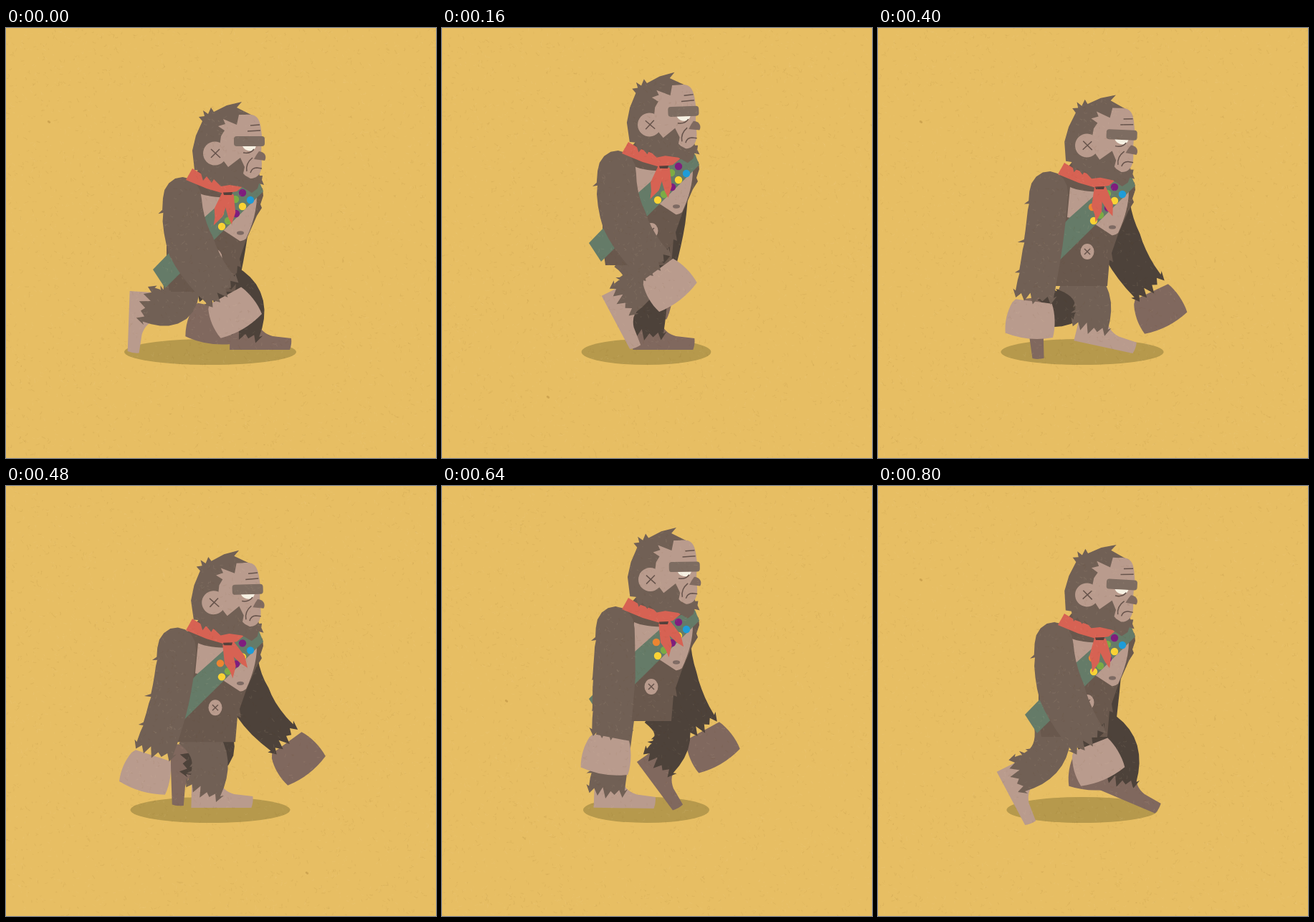
Write an HTML page with a canvas that moves like this. It is 600x600 px and loops after 0.84 s.

```html
<!DOCTYPE html>
<html lang="en">
<head>
<meta charset="utf-8">
<title>Walk cycle</title>
<style>
  html, body { margin: 0; width: 100%; height: 100%; overflow: hidden; background: #e7be63; }
  svg, canvas { position: absolute; left: 0; top: 0; width: 100%; height: 100%; display: block; }
  .fur { fill: #716055; }
  .dark { fill: #4d423a; }
  .skin { fill: #b99b8d; }
  .shade { fill: #80685e; }
  .red { fill: #d76253; }
  .line { fill: none; stroke: #66534b; stroke-width: 1.5; }
</style>
</head>
<body>
<svg viewBox="0 0 600 600">
  <rect width="600" height="600" fill="#e7be63"/>
  <ellipse id="shadow" cx="285" cy="452" ry="18" fill="#b6994c"/>

  <path id="farHand" class="shade"/>
  <path id="farArm" class="dark"/>
  <path id="farFoot" class="shade"/>
  <path id="farLeg" class="dark"/>

  <path id="nearFoot" class="skin"/>
  <path id="nearLeg" class="fur"/>

  <g id="body">
    <path fill="#69584d" d="M224 260L241 222L258 210L270 196L335 200L345 212L358 224L359 234L355 246L357 251L350 262L335 296L326 322L328 334L323 332L320 368L228 368L224 340Z"/>
    <path class="skin" d="M268 230Q290 240 350 235Q350 262 335 294Q330 298 326 297L300 280L264 272Z"/>
    <ellipse cx="327" cy="286" rx="5" ry="2.7" fill="#7d6a63"/>
    <path d="M205 337L268 272L322 224L353 213L359 228L222 363Z" fill="#657b68"/>
    <g id="badges"></g>
    <ellipse class="skin" cx="292" cy="320" rx="9.5" ry="11"/>
    <path class="line" d="M288 316l8 8m0 -8l-8 8"/>
  </g>

  <path id="cuff" class="dark" d="M8 -4L32 -6L25 5L12 8Z"/>
  <path id="nearHand" class="skin"/>
  <path id="nearArm" class="fur"/>

  <g id="scarf">
    <g id="tails">
      <path class="red" d="M-7 0L-12 26L-8 38L-7 49L2 34L4 4Z"/>
      <path class="red" d="M-1 0L9 0L18 24L17 41L10 33L0 16Z"/>
    </g>
    <path class="red" d="M260 196L251 212L280 224L304 231L322 228L334 218L326 214L300 214L275 205Z"/>
    <path d="M303 229.500L316 229L315 233L304 233Z" fill="#54403b"/>
  </g>

  <g id="head">
    <path class="fur" d="M260 171L265 150L274 130L269 124L277 123L275 115L282 120L286 111L290 117L308 108L329 103L322 111L336 118L348 124L340 160L354 206L358 206L357 212L360 219L353 217L351 224L343 230L330 222L312 219L300 221L290 211L287 216L280 207L275 213L271 199L263 198Z"/>
    <path class="skin" d="M333 121C351 119 355 126 357 150L356 176L357 189C357 204 350 210 341 210L334 206L331 203L333 194L327 181L310 194L304 186L298 165L300 151L305 143L296 137L306 134L303 127L322 135L325 121Z"/>
    <circle class="skin" cx="291.500" cy="175" r="16.500"/>
    <path class="line" d="M286 169l13 12m-1 -12l-12 12"/>
    <rect x="318" y="151" width="43" height="14" rx="4" fill="#7d6c61"/>
    <path d="M330 165H349Q347 171 341 171.500Q333 171 330 165Z" fill="#f6f1e3"/>
    <path d="M353 172C362 173 364 180 361 185L346 183Q349 177 353 172Z" fill="#7f6a60"/>
    <path class="line" d="M341 136L354 135M337 144L355 143M331 174Q341 176 346 169M344 181Q334 189 336 200M341 202Q343 195 350 195L357 196"/>
  </g>
</svg>

<script>
const LOOP = 840, STEP = 40;
const $ = id => document.getElementById(id);
const set = (id, name, value) => $(id).setAttribute(name, value);
const wave = (t, peak) => Math.cos(2 * Math.PI * (t - peak) / LOOP);
const wrap = (t, p) => ((t % p) + p) % p;
const polar = ([x, y], deg, len) => {
  const a = deg * Math.PI / 180;
  return [x + Math.sin(a) * len, y + Math.cos(a) * len];
};

// Periodic monotone spline through rows of [time, value, ...].
function track(period, rows) {
  const n = rows.length;
  const row = i => {
    const r = rows[wrap(i, n)];
    return [r[0] + Math.floor(i / n) * period, ...r.slice(1)];
  };
  const slope = (i, k) => (row(i + 1)[k] - row(i)[k]) / (row(i + 1)[0] - row(i)[0]);
  const tangent = (i, k) => {
    const a = slope(i - 1, k), b = slope(i, k);
    return a * b > 0 ? 2 * a * b / (a + b) : 0;
  };
  return time => {
    const t = wrap(time, period);
    let i = n - 1;
    while (i > 0 && rows[i][0] > t) i--;
    const a = row(i), b = row(i + 1), h = b[0] - a[0], u = (t - a[0]) / h;
    return a.slice(1).map((v, j) => {
      const k = j + 1, w = 1 - u;
      return v * (1 + 2 * u) * w * w + b[k] * u * u * (3 - 2 * u)
        + h * (tangent(i, k) * u * w * w - tangent(i + 1, k) * u * u * w);
    });
  };
}

const bob = track(LOOP / 2, [
  [0, 0], [140, -34], [160, -37], [225, -40], [300, -34], [320, -30], [380, -18], [400, -8]
]);
// x, y, turn
const headPose = track(LOOP, [
  [0, 0, 0, 0], [160, -2, -3, -2], [320, 1, -6, 3.3], [400, 0, -3, 2.4],
  [560, -3, -1, -5], [720, 1, -8, 3.4], [800, 0, -5, 3]
]);
const tailTurn = track(LOOP, [
  [0, 15], [160, 14], [320, 1], [400, -2], [560, -29], [720, -1], [800, 4]
]);
const anklePose = track(LOOP, [
  [0, 199, 386, 92], [140, 246, 372, 74], [160, 255, 377, 62], [310, 278, 392, 43],
  [390, 298, 409, 19], [420, 291, 422, 0], [460, 282, 422, 0], [570, 248, 422, 0],
  [680, 222, 422, 2], [720, 217, 420, 12], [740, 211, 418, 27], [800, 198, 402, 62],
  [820, 194, 392, 82]
]);

// Limb outline along a quadratic curve, with tufts on the back and a ragged end.
function tube(p, c, q, widths, { cap, spikes = {}, teeth = 5, tooth = 12 }) {
  const [w0, w1, w2] = widths, left = [], right = [], N = 10;
  let at;
  for (let i = 0; i <= N; i++) {
    const u = i / N, v = 1 - u;
    const pos = [0, 1].map(k => v * v * p[k] + 2 * u * v * c[k] + u * u * q[k]);
    const d = [0, 1].map(k => v * (c[k] - p[k]) + u * (q[k] - c[k]));
    const len = Math.hypot(...d) || 1;
    const tx = d[0] / len, ty = d[1] / len;
    const w = u < .5 ? w0 + (w1 - w0) * u * 2 : w1 + (w2 - w1) * (u * 2 - 1);
    at = (side, along) => [pos[0] + ty * side + tx * along, pos[1] - tx * side + ty * along];
    if (i === 0 && cap) {
      for (let a = 0; a <= 8; a++) {
        const g = a * Math.PI / 8;
        right.push(at(-w * Math.cos(g), -cap * Math.sin(g)));
      }
    }
    left.push(at(-w, 0));
    if (spikes[i]) left.push(at(-w - spikes[i], 5), at(-w + 1, 4));
    right.push(at(w, 0));
  }
  const end = [];
  for (let j = 0; j <= teeth * 2; j++) {
    const s = 1 - j / teeth;
    const depth = j % 2 ? tooth * (.6 + j * .37 % 1 * .8) : j * 5 % 7 - 3;
    end.push(at(s * (w2 + 4), depth));
  }
  const all = [...right, ...end, ...left.reverse()];
  return 'M' + all.map(a => a.map(n => n.toFixed(1)).join(' ')).join('L') + 'Z';
}

function drawArm(name, t, dx, dy, girth) {
  const swing = wave(t, 80), lead = wave(t, 20);
  const shoulder = [242 + 4 * lead + dx, 238 + dy];
  const elbow = polar(shoulder, 1 + 4 * swing + 4 * lead, 70);
  const fore = 12 + 30 * swing;
  const wrist = polar(elbow, fore, 80), cuff = polar(elbow, fore, 73);
  const turn = 9 + 29 * wave(t, 110);
  const hand = polar(wrist, turn, 31);
  const bend = [0, 1].map(k => elbow[k] * 1.6 - (shoulder[k] + wrist[k]) * .3);
  set(name + 'Arm', 'd', tube(shoulder, bend, cuff, [27, 30 + 3 * lead, 27].map(w => w * girth), {
    cap: 30, spikes: { 1: 6, 5: Math.max(0, -lead * 9), 8: Math.max(0, -lead * 6) }, tooth: 11
  }));
  set(name + 'Hand', 'transform', `translate(${hand}) rotate(${-turn}) scale(1.04)`);
  if (name === 'near') {
    set('cuff', 'transform', `translate(${cuff}) rotate(${-fore})`);
    set('cuff', 'visibility', wave(t, 150) > .1 ? 'visible' : 'hidden');
  }
}

function drawLeg(name, t, dx, dy) {
  const [ax, ay, turn] = anklePose(t);
  const hip = [252 + 10 * wave(t, 330) + dx, 350 + dy], ankle = [ax + dx, ay];
  const vx = ankle[0] - hip[0], vy = ankle[1] - hip[1], d = Math.hypot(vx, vy);
  const out = Math.sqrt(Math.max(0, 55 * 55 - d * d / 4)) / d;
  const knee = [hip[0] + vx / 2 + vy * out, hip[1] + vy / 2 - vx * out];
  set(name + 'Leg', 'd', tube(hip, knee, ankle, [25, 25, 25], {
    spikes: { 6: 4, 8: 6 }, tooth: 11
  }));
  set(name + 'Foot', 'transform', `translate(${ankle}) rotate(${turn})`);
}

function draw(t) {
  const [dy] = bob(t), half = t + LOOP / 2;
  set('shadow', 'rx', 120 + dy * .8);
  set('body', 'transform', `translate(0 ${dy})`);
  set('scarf', 'transform', `translate(0 ${dy})`);
  set('tails', 'transform', `translate(309 230) rotate(${tailTurn(t)[0]})`);
  const [hx, hy, turn] = headPose(t);
  set('head', 'transform', `translate(${hx} ${hy + dy}) rotate(${turn} 292 175)`);
  drawArm('far', half, 80, dy, .9);
  drawLeg('far', half, 39, dy);
  drawLeg('near', t, 0, dy);
  drawArm('near', t, 0, dy, 1);
}

for (const name of ['near', 'far']) {
  set(name + 'Hand', 'd', 'M-24 -27L25 -27C31 -15 34 3 32 18Q0 28 -32 20C-35 5 -33 -10 -28 -22Z');
  set(name + 'Foot', 'd', 'M-17 -14L-18 27L66 27Q69 19 68 11L42 8Q24 3 21 -14Z');
}

const badges = [
  [330, 230, '#7f1d7e'], [341, 240, '#1f9cd8'], [330, 249, '#fbd334'], [320, 239, '#7cab45'],
  [321, 259, '#7f1d7e'], [310, 269, '#7cab45'], [299, 258, '#ec8531'], [301, 277, '#fbd334']
];
$('badges').innerHTML = badges.map(([x, y, fill]) =>
  `<circle cx="${x}" cy="${y}" r="5.200" fill="${fill}"/>`).join('');

// Paper grain: faint seeded fibres, with one darker speck per sheet.
function paper(seed, x, y) {
  const sheet = document.createElement('canvas');
  sheet.width = sheet.height = 600;
  const g = sheet.getContext('2d');
  let s = seed;
  const rand = () => (s = s * 16807 % 2147483647) / 2147483647;
  for (let i = 0; i < 5000; i++) {
    const px = rand() * 600, py = rand() * 600, a = rand() * 6.3, len = 1 + rand() * 4;
    g.strokeStyle = i % 2 ? 'rgba(255,235,190,.08)' : 'rgba(110,75,20,.06)';
    g.lineWidth = .6 + rand() * .7;
    g.beginPath();
    g.moveTo(px, py);
    g.quadraticCurveTo(px + rand() * 3, py + rand() * 3,
      px + Math.cos(a) * len, py + Math.sin(a) * len);
    g.stroke();
  }
  g.fillStyle = 'rgba(150,105,35,.3)';
  g.beginPath();
  g.ellipse(x, y, 2.4, 1.6, .6, 0, 7);
  g.fill();
  document.body.append(sheet);
  return sheet;
}
const sheets = [[11, 60, 131], [37, 420, 540], [59, 148, 515], [83, 90, 300], [97, 531, 427]]
  .map(a => paper(...a));

const start = performance.now();
let shown = -1;
function tick() {
  const step = Math.floor(((performance.now() - start) % LOOP) / STEP);
  if (step !== shown) {
    shown = step;
    draw(step * STEP);
    const current = step >= 18 ? 0 : (step >> 1) % sheets.length;
    sheets.forEach((c, i) => { c.style.visibility = i === current ? 'visible' : 'hidden'; });
  }
  requestAnimationFrame(tick);
}
tick();
</script>
</body>
</html>
```
